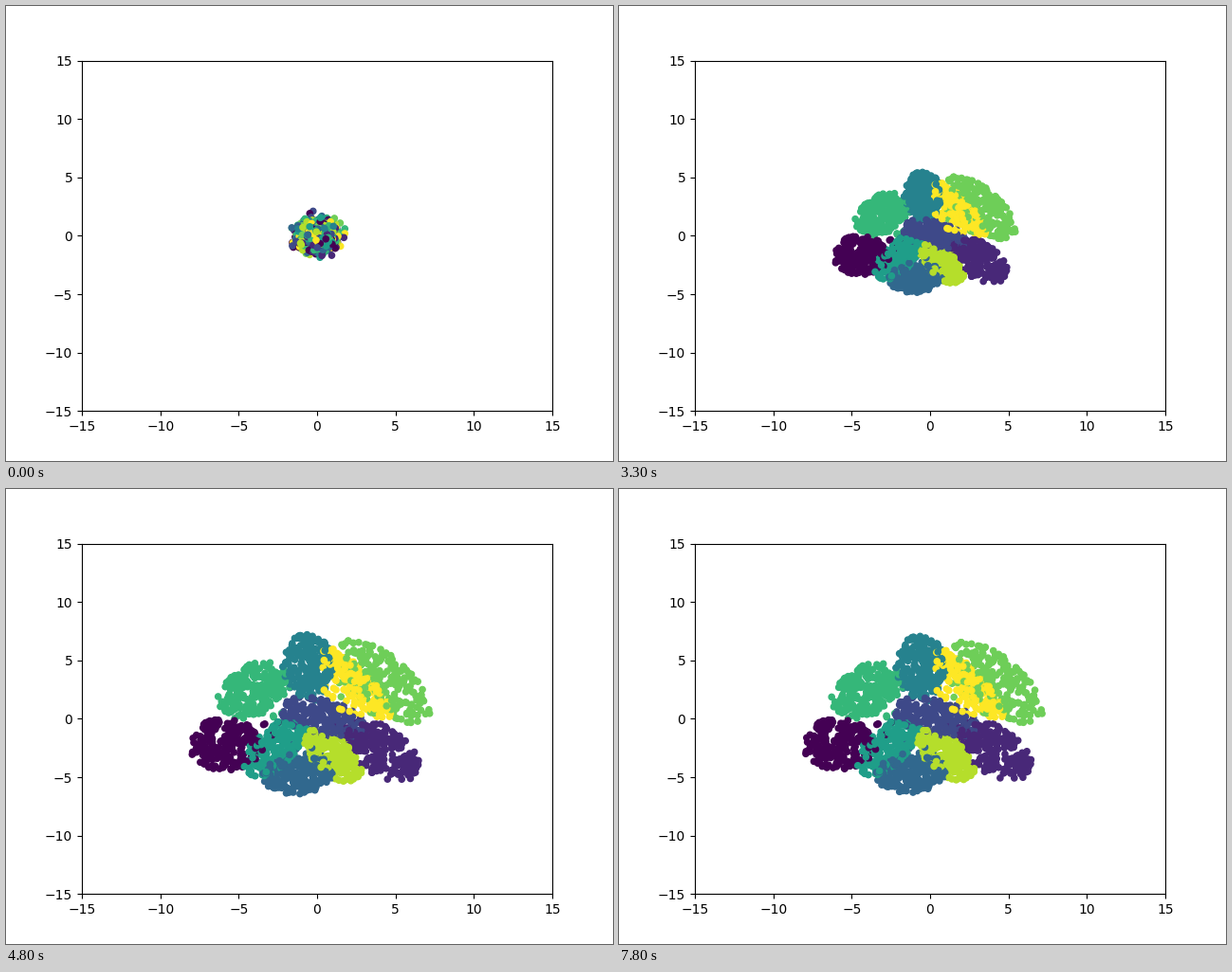
A matplotlib script for the animation above (8 s loop, 640 by 480 pixels).

```python
import numpy as np
import matplotlib.pyplot as plt
from matplotlib.animation import FuncAnimation

STEP_MS, TICK_MS, LOOP_MS = 300, 100, 8000
PER_CLASS = 220

rng = np.random.default_rng(11)


def cluster(x, y, length, width, tilt=0):
    """Random points filling a tilted ellipse, a few straying inwards."""
    angle = rng.uniform(0, 2 * np.pi, PER_CLASS)
    radius = np.sqrt(rng.random(PER_CLASS))
    along, across = length * radius * np.cos(angle), width * radius * np.sin(angle)
    c, s = np.cos(np.radians(tilt)), np.sin(np.radians(tilt))
    points = np.column_stack([x + along * c - across * s, y + along * s + across * c])
    stray = rng.random(PER_CLASS) < 0.1
    points[stray] *= rng.uniform(0.5, 1, (stray.sum(), 1))
    return points


settled = np.concatenate([
    cluster(-5.9, -2.2, 2.25, 2.25),
    cluster(4.1, -2.7, 3.0, 1.8, -50),
    cluster(0.4, 0.1, 2.9, 1.5, -20),
    cluster(-1.2, -4.6, 2.3, 1.7, 10),
    cluster(-0.6, 4.5, 2.7, 1.6, 90),
    cluster(-2.6, -2.4, 2.9, 1.5, 55),
    cluster(-4.1, 2.4, 2.7, 1.85, 50),
    cluster(4.3, 3.1, 4.2, 1.8, -52),
    cluster(1.0, -3.1, 2.6, 1.3, -55),
    cluster(2.5, 3.0, 3.6, 1.0, -56),
])
labels = np.repeat(np.arange(10), PER_CLASS)
order = rng.permutation(len(labels))
settled, labels = settled[order], labels[order]
cloud = rng.normal(0, 0.55, settled.shape)


def positions(ms):
    """Sort the cloud into small clusters, then expand and settle."""
    sorting = min(ms / 1200, 1)
    times = [1200, 2100, 3300, 4200, 5400]
    scale = [np.interp(ms, times, [0.36, 0.43, 0.76, 1.01, 1]),
             np.interp(ms, times, [0.5, 0.55, 0.77, 1.04, 1])]
    return cloud * (1 - sorting) + settled * scale * sorting


fig, ax = plt.subplots(figsize=(6.4, 4.8), dpi=100)
ax.set(xlim=(-15, 15), ylim=(-15, 15))
dots = ax.scatter(*positions(0).T, s=20, c=labels, cmap="viridis")


def update(frame):
    dots.set_offsets(positions(frame * TICK_MS // STEP_MS * STEP_MS))
    return (dots,)


anim = FuncAnimation(fig, update, frames=LOOP_MS // TICK_MS, interval=TICK_MS,
                     repeat=True, repeat_delay=0)
plt.show()
```
